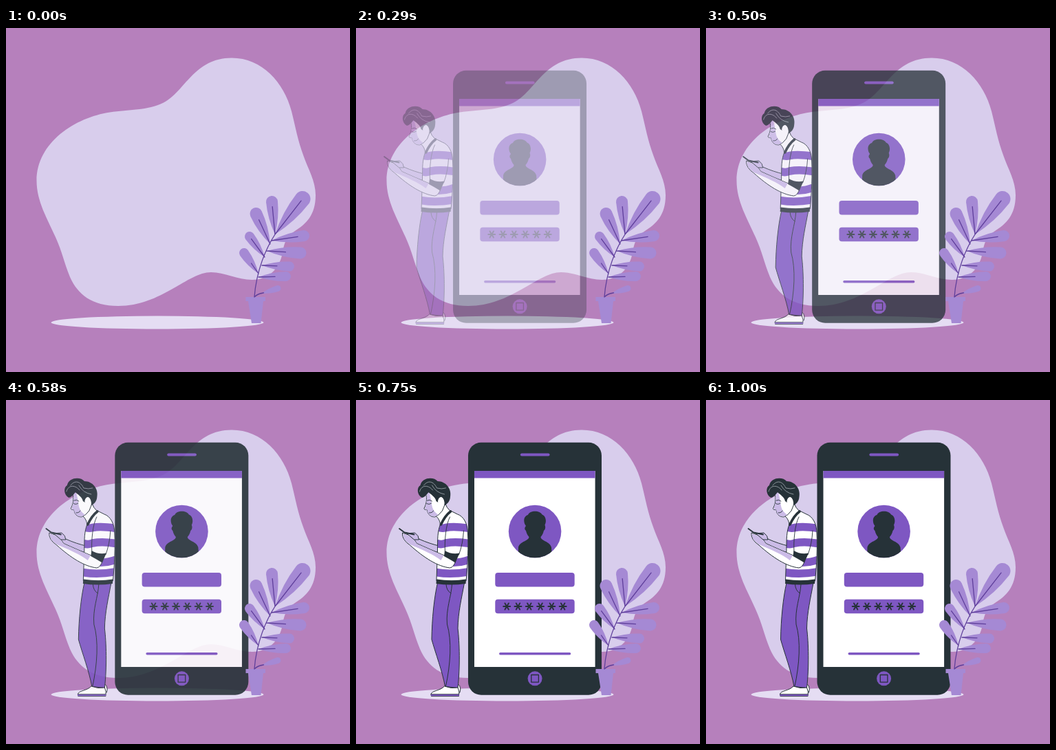
An HTML page that plays this animation: 500x500 px, repeating every 1.04 s.

```html
<!DOCTYPE html>
<html lang="en">
<head>
<meta charset="utf-8">
<style>
  html, body { margin: 0; width: 100%; height: 100%; overflow: hidden; background: #b680bc; }
  svg { display: block; width: 100%; height: 100%; }
  .p { fill: #7e57c2; }
  .d { fill: #263238; }
  .w { fill: #fff; }
  .s { fill: #cbbbe7; }
  .o { stroke: #263238; stroke-width: 1; stroke-linejoin: round; }
  .l { fill: none; stroke-linecap: round; stroke-linejoin: round; }
  .pl { stroke: #7e57c2; }
  .dl { stroke: #263238; }
</style>
</head>
<body>
<svg viewBox="0 0 500 500">
  <defs>
    <clipPath id="face"><circle cx="258.600" cy="191" r="38.300"/></clipPath>
    <path id="shirtShape" d="M121 181C117 191 117 203 117 218L115.500 263H158.500C161 240 162 212 161 194C161 180 155 169 146 166L136 161Z"/>
    <clipPath id="shirt"><use href="#shirtShape"/></clipPath>
  </defs>

  <path fill="#d8cdec" d="M328 43.500C372 43.500 404 79 415 121C421 145 424 163 432.500 186C439 205 450 222 450 243C450 272 436 285 420 295C404 305 404 318 401 331C395 354 378 366 358 366C336 366 318 355 298 355C264 355 226 404 163 404C125 404 104 387 93 362C84 340 82 326 72 304C60 277 44.500 252 44.500 222C44.500 166 101 130 151 122.500C178 118.500 206 120 229 108.500C260 93 273 43.500 328 43.500Z"/>
  <ellipse cx="220" cy="428" rx="154.500" ry="9.500" fill="#e5ddf3"/>

  <g id="scene" opacity="0">
    <!-- phone -->
    <rect class="d" x="161.500" y="61.800" width="194" height="367" rx="19"/>
    <rect class="w" x="170.500" y="103" width="175.600" height="285"/>
    <rect class="p" x="170.500" y="103" width="175.600" height="10.500"/>
    <path class="l pl" stroke-width="4.200" d="M239.500 79.500H278"/>
    <circle class="p" cx="258.600" cy="191" r="38.300"/>
    <path class="d" clip-path="url(#face)" d="M245.500 183C241.500 178 241.500 169 248.500 167C251 160 266 160 269 166.500C275 169 275.500 177 273 181.500Q275 187 271.500 190Q270 196 267 199C267 205 280 205 282.500 214L284 232H234L234.500 214C237 205 250 205 250 199Q247 196 245.500 190Q242 187 245.500 183Z"/>
    <rect class="p" x="200.800" y="251" width="115.400" height="20.500" rx="4"/>
    <rect class="p" x="200.800" y="289.700" width="115.400" height="20.500" rx="4"/>
    <g id="stars" class="l dl" stroke-width="1.900"></g>
    <path class="l pl" stroke-width="3.500" d="M208.300 368.700H309"/>
    <circle class="p" cx="258.600" cy="404.800" r="10.500"/>
    <rect class="l dl" x="253.300" y="399.500" width="10.600" height="10.600" stroke-width="1.300"/>

    <!-- legs and shoes -->
    <path class="w o" d="M144 411L149 415Q151.500 420 149.500 425H142Z"/>
    <path class="p o" d="M117 266H156C152 288 147 308 146.500 332C149 352 150 388 146.500 418.500L128 416.500C124 394 114 368 108.500 348C109 318 112 288 117 266Z"/>
    <path class="l dl" stroke-width="1" d="M138 268C137 286 129 304 131 326C138 350 136 384 129 416M129.500 268Q130 277 136.500 281"/>
    <path class="w o" d="M107.500 428C108 422 121 423 127 416Q137 420 146.500 418Q149.500 424 148 430H108Z"/>
    <path class="l pl" stroke-width="2" d="M108 429H147.500"/>
    <path class="l dl" stroke-width=".8" d="M107.500 427.500H148M108 430.500H148"/>

    <!-- far arm -->
    <path class="s o" d="M84 195L90 202C101 207 111 210 119 212V222C105 218 90 211 78 206L66 196Z"/>

    <!-- neck and face -->
    <path class="w o" d="M114 168C119 172 121 177 121 183L137 163Q130 157 127 148Z"/>
    <path class="w o" d="M100 135C102 144 101 151 97.500 157.500Q97.500 160 102 159.500L103 164Q106 170 113 170Q119 168 124 161L130 146L118 133Z"/>
    <path class="s" d="M101 135C102 145 101 151 98.500 157.500Q98 159.500 102 159.500L103 164Q106 169.500 113 169.500L118 167Q110 161 109 154L107 142L105 134Z"/>
    <path class="l dl" stroke-width=".9" d="M101 150Q104 153 108 150M102 146Q106 144 109 147M105 164Q110 164 111 161"/>
    <path class="d" d="M94.500 142C87 138 86.500 127 92 124C94 112 112 111 117 118C129 118 138 129 135.500 141C135 148 131 151 127 153.500Q128 143 122 141Q118 143 118 149L115 147C114 141 107 137 104 134Q99 141 94.500 142Z"/>
    <path class="w" d="M117.500 147C119 139 126 140 125 147Q123 155 119 154Z"/>
    <path class="l" stroke="#b8bfc6" stroke-width=".7" d="M91 133C94 122 105 124 110 131M97 124C105 114 113 121 116 128Q123 130 129 128M109 124Q115 135 127 137"/>

    <!-- shirt -->
    <use href="#shirtShape" class="w"/>
    <path class="l pl" clip-path="url(#shirt)" stroke-width="11.500" d="M112 181Q120 188 129 185.500Q142 183 166 187M112 206Q120 212 129 208Q144 205 166 209M112 230Q140 242 166 231M112 250Q136 255 166 249"/>
    <use href="#shirtShape" class="l o"/>
    <path class="d" d="M115.500 260.500Q138 264 158.500 260.500L158 267Q136 270 115 267Z"/>
    <path class="l dl" stroke-width="3.600" d="M122 181Q128 168 136 162"/>
    <path class="l dl" stroke-width=".9" d="M135 170C129 181 127 205 128 221M155 190Q154 209 148 225"/>

    <!-- near arm, hand and stylus -->
    <path class="w o" d="M127 226C113 220 99 214 87 208.500L80 198L66 193Q65 203 77 211C97 229 117 242 135 244Q141 243 143.500 233Z"/>
    <path class="s" d="M126 226L87 209L80 199L66.500 194Q66 203 77 210C94 217 112 225 122 233Z"/>
    <path class="d" d="M127.500 219C134 223 142 224 149 222.500L143 236.500Q134 231 126.500 227Z"/>
    <path class="s o" d="M72 194L84 193Q90 197 90 203L83 203L76 197Z"/>
    <path class="l dl" stroke-width="1.800" d="M61.500 187L69 192.500L83 195.500"/>
  </g>

  <g id="plant" fill="#a589d4">
    <path d="M348.500 391H377V397H374L370.500 429H357L352 397H348.500Z"/>
    <g id="leaves"></g>
    <path id="veins" class="l" stroke="#5f3f9b" stroke-width="1.300"/>
  </g>
</svg>
<script>
const $ = id => document.getElementById(id);

$('stars').innerHTML = [0, 1, 2, 3, 4, 5].map(i =>
  `<path transform="translate(${217.7 + i * 16.3} 300)" d="M-5 0H5M-2.700-4.600L2.700 4.600M2.700-4.600L-2.700 4.600"/>`).join('');

// Leaf: round end x, y, radius; base x, y; vein length as a share of the leaf
const leaves = [
  [431, 248.500, 11.500, 391, 300, .95], [386.500, 252.500, 8.500, 391, 300, .85],
  [363.500, 270, 9, 384, 314, .8], [354, 303, 7, 376, 333, .88],
  [346, 327, 7, 367, 357, .5], [433, 302, 8, 386, 309, .81],
  [428, 327, 8.500, 379, 324, .56], [412, 346.500, 7, 372, 345, .55],
  [407, 361, 7, 367, 362, .6], [395, 378.500, 4.500, 371, 386, .15]
];
let veins = 'M361 391C364 352 378 320 391 300M361 391Q366 386 374 385';
$('leaves').innerHTML = leaves.map(([x, y, r, bx, by, v]) => {
  const dx = x - bx, dy = y - by, len = Math.hypot(dx, dy);
  const nx = -dy / len * r, ny = dx / len * r;
  const cx = x - dx * .5, cy = y - dy * .5;
  veins += `M${bx} ${by}L${bx + dx * v} ${by + dy * v}`;
  return `<path d="M${bx} ${by}Q${cx + nx} ${cy + ny} ${x + nx} ${y + ny}` +
    `A${r} ${r} 0 0 0 ${x - nx} ${y - ny}Q${cx - nx} ${cy - ny} ${bx} ${by}Z"/>`;
}).join('');
$('veins').setAttribute('d', veins);

// cubic-bezier(.36, -.01, .5, 1.38), solved by bisection
const bez = (a, b, s) => 3 * (1 - s) ** 2 * s * a + 3 * (1 - s) * s * s * b + s ** 3;
function ease(t) {
  let lo = 0, hi = 1;
  for (let i = 0; i < 30; i++) {
    const mid = (lo + hi) / 2;
    if (bez(.36, .5, mid) < t) lo = mid; else hi = mid;
  }
  return bez(-.01, 1.38, lo);
}

const LOOP = 1040, FPS = 24, SLIDE = 30;
const start = performance.now();
function draw() {
  const t = (performance.now() - start) % LOOP;
  const step = Math.floor((t + 4) * FPS / 1000);
  const p = step < 3 ? 0 : ease(Math.min(1, step / FPS + .006));
  $('scene').setAttribute('opacity', Math.max(0, Math.min(1, p)));
  $('scene').setAttribute('transform', `translate(${SLIDE * (p - 1)} 0)`);
  requestAnimationFrame(draw);
}
draw();
</script>
</body>
</html>
```
